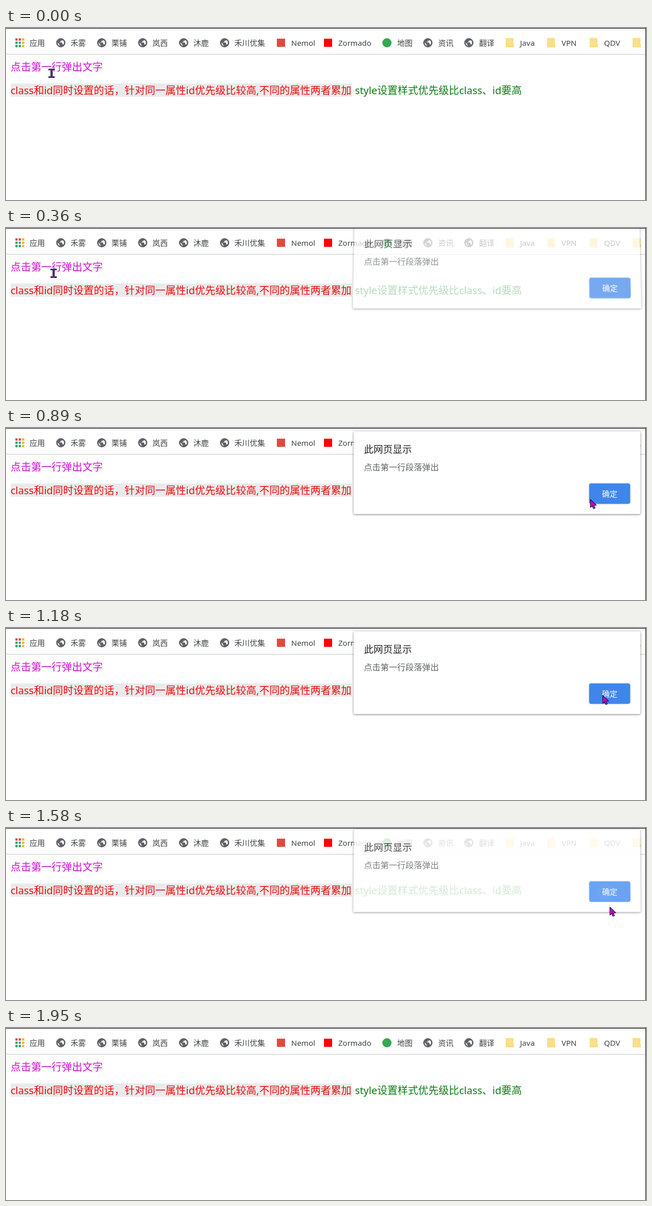
Recreate the animation shown at these times as an HTML page. Size 1250x338 px, loop 2.35 s.

```html
<!DOCTYPE html>
<html lang="zh-CN">
<head>
<meta charset="utf-8">
<style>
  html, body { margin: 0; width: 100%; height: 100%; overflow: hidden; background: #fff; }
  body, text { font-family: "Noto Sans", "Noto Sans CJK SC", sans-serif; }
  svg { position: absolute; left: 0; top: 0; }
  .line { font-size: 20px; }
  .bookmark { font-size: 15px; fill: #3c4043; }
  #dialog {
    position: absolute; left: 679px; top: 7px; width: 560px; height: 162px;
    background: #fff; border-radius: 2px;
    box-shadow: 0 1px 4px rgba(0, 0, 0, .5);
  }
</style>
</head>
<body>
<svg width="1250" height="338">
  <defs>
    <path id="globe" fill="#5f6368" stroke="#5f6368" stroke-width="1.200" transform="scale(.85) translate(-12 -12)" d="M12 2C6.48 2 2 6.48 2 12s4.48 10 10 10 10-4.48 10-10S17.52 2 12 2zm-1 17.93c-3.95-.49-7-3.85-7-7.93 0-.62.08-1.21.21-1.79L9 15v1c0 1.1.9 2 2 2v1.93zm6.9-2.54c-.26-.81-1-1.39-1.9-1.39h-1v-3c0-.55-.45-1-1-1H8v-2h2c.55 0 1-.45 1-1V7h2c1.1 0 2-.9 2-2v-.41c2.93 1.19 5 4.06 5 7.41 0 2.08-.8 3.97-2.1 5.39z"/>
    <path id="folder" fill="#fbdf8a" stroke="#f6d67c" d="M-7.500-8.500h14v12h1v5h-15z"/>
    <rect id="mail" x="-8" y="-8" width="16" height="16" fill="#e0493e"/>
    <rect id="video" x="-8" y="-8" width="16" height="16" fill="#f00"/>
    <circle id="map" r="9" fill="#34a853"/>
    <g id="apps"></g>
  </defs>
  <rect x="175" y="-26" width="1100" height="31" rx="15" fill="#f1f3f4"/>
  <rect y="51" width="1250" height="1.500" fill="#d5d6d8"/>
  <g id="bar"></g>
  <text class="line" x="9" y="84" fill="#ce0ece">点击第一行弹出文字</text>
  <rect x="9" y="109" width="666" height="26" fill="#ebebeb"/>
  <text class="line" x="9" y="130" fill="#ea0c0c">class和id同时设置的话，针对同一属性id优先级比较高,不同的属性两者累加</text>
  <text class="line" x="681.500" y="130" fill="#0a7c12">style设置样式优先级比class、id要高</text>
</svg>

<div id="dialog">
  <svg width="560" height="162">
    <text x="20" y="42" font-size="18.750" fill="#202124">此网页显示</text>
    <text x="20" y="76" font-size="16.250" fill="#5f6368">点击第一行段落弹出</text>
    <rect x="459.500" y="101.500" width="81" height="41" rx="5" fill="none" stroke="#d3e3fb" stroke-width="2"/>
    <rect id="button" x="460" y="102" width="80" height="40" rx="4"/>
    <circle id="ripple" cx="491" cy="123" fill="#fff" opacity=".12"/>
    <text x="485" y="128" font-size="15" font-weight="500" fill="#fff">确定</text>
  </svg>
</div>

<svg width="1250" height="338">
  <g id="cursor" stroke-linejoin="round">
    <path id="beam" fill="#7b2c94" stroke="#2b1742" stroke-width="1.200" d="M-5.500-8.500h11v2h-4v13h4v2h-11v-2h4v-13h-4z"/>
    <path id="arrow" fill="#c800d8" stroke="#2b1742" stroke-width="1.300" d="M.5.5V16l3.500-3 2.500 5.500 3-1.300L7 12l5-.3z"/>
  </g>
  <path d="M0 .5H1249.500V338" fill="none" stroke="#000"/>
</svg>

<script>
const LOOP = 2350, STEP = 40.7;
const $ = id => document.getElementById(id);
const clamp = v => Math.max(0, Math.min(1, v));

// icon, icon centre, label, label start
const bookmarks = [
  ['apps', 27, '应用', 46], ['globe', 107, '禾雾', 126], ['globe', 187, '栗铺', 206],
  ['globe', 267, '岚西', 286], ['globe', 347, '沐鹿', 366], ['globe', 427, '禾川优集', 446],
  ['mail', 537, 'Nemol', 557], ['video', 629, 'Zormado', 649], ['map', 744, '地图', 764],
  ['globe', 824, '资讯', 844], ['globe', 904, '翻译', 924], ['folder', 984, 'Java', 1004],
  ['folder', 1065, 'VPN', 1085], ['folder', 1148, 'QDV', 1168], ['folder', 1232, '', 1250]
];
$('bar').innerHTML = bookmarks.map(([icon, cx, label, x]) =>
  `<use href="#${icon}" x="${cx}" y="29"/><text class="bookmark" x="${x}" y="35">${label}</text>`).join('');

const [red, yellow, green, blue] = ['#e0493e', '#f4b400', '#2e9e5b', '#4285f4'];
$('apps').innerHTML = [red, red, yellow, green, blue, yellow, green, green, yellow].map((c, i) =>
  `<rect x="${i % 3 * 6.5 - 8.75}" y="${(i / 3 | 0) * 6.5 - 8.75}" width="4.5" height="4.5" rx="1" fill="${c}"/>`).join('');

// time, x, y of the pointer's hot spot
const path = [
  [0, 89, 89], [34, 100, 89], [75, 96, 89], [115, 93, 89], [400, 93, 89], [445, 160, 108],
  [563, 532, 177], [610, 690, 172], [726, 1030, 150], [807, 1128, 142], [888, 1141, 140],
  [1050, 1158, 134], [1300, 1172, 130], [1460, 1172, 131], [1499, 1186, 145],
  [1550, 1184, 150], [1662, 1166, 167], [1740, 1170, 230], [1855, 1179, 334], [1950, 1179, 335]
];

function pointerAt(t) {
  const i = Math.max(1, path.findIndex(p => p[0] > t));
  const [a, b] = [path[i - 1], path[i]];
  const k = clamp((t - a[0]) / (b[0] - a[0]));
  return [a[1] + (b[1] - a[1]) * k, a[2] + (b[2] - a[2]) * k];
}

function drawDialog(t) {
  const opening = clamp((t - 280) / 250), closing = clamp((t - 1555) / 150);
  const lift = 35 * (1 - opening) ** 3 + 24 * closing;
  const style = $('dialog').style;
  style.opacity = Math.min(clamp((t - 270) / 125), 1 - closing);
  style.transform = lift ? `translateY(${-lift}px) perspective(1100px) rotateX(${lift * .4}deg)` : 'none';
  $('button').setAttribute('fill', t > 1400 ? '#4b90f0' : '#4086ea');
  $('ripple').setAttribute('r', 16 * clamp((t - 1400) / 90));
  $('ripple').setAttribute('opacity', .12 * (1 - clamp((t - 1510) / 100)));
}

function drawPointer(t) {
  const visible = t < 1940;
  $('cursor').style.display = visible ? '' : 'none';
  if (!visible) return;
  const isBeam = t < 600 || (t > 1480 && t < 1580);
  $('beam').style.display = isBeam ? '' : 'none';
  $('arrow').style.display = isBeam ? 'none' : '';
  $('cursor').setAttribute('transform', `translate(${pointerAt(t).map(Math.round)})`);
}

function frame() {
  const now = performance.now() % LOOP;
  const t = Math.floor((now + 10) / STEP) * STEP - 7;
  drawDialog(t);
  drawPointer(t);
  requestAnimationFrame(frame);
}
frame();
</script>
</body>
</html>
```
